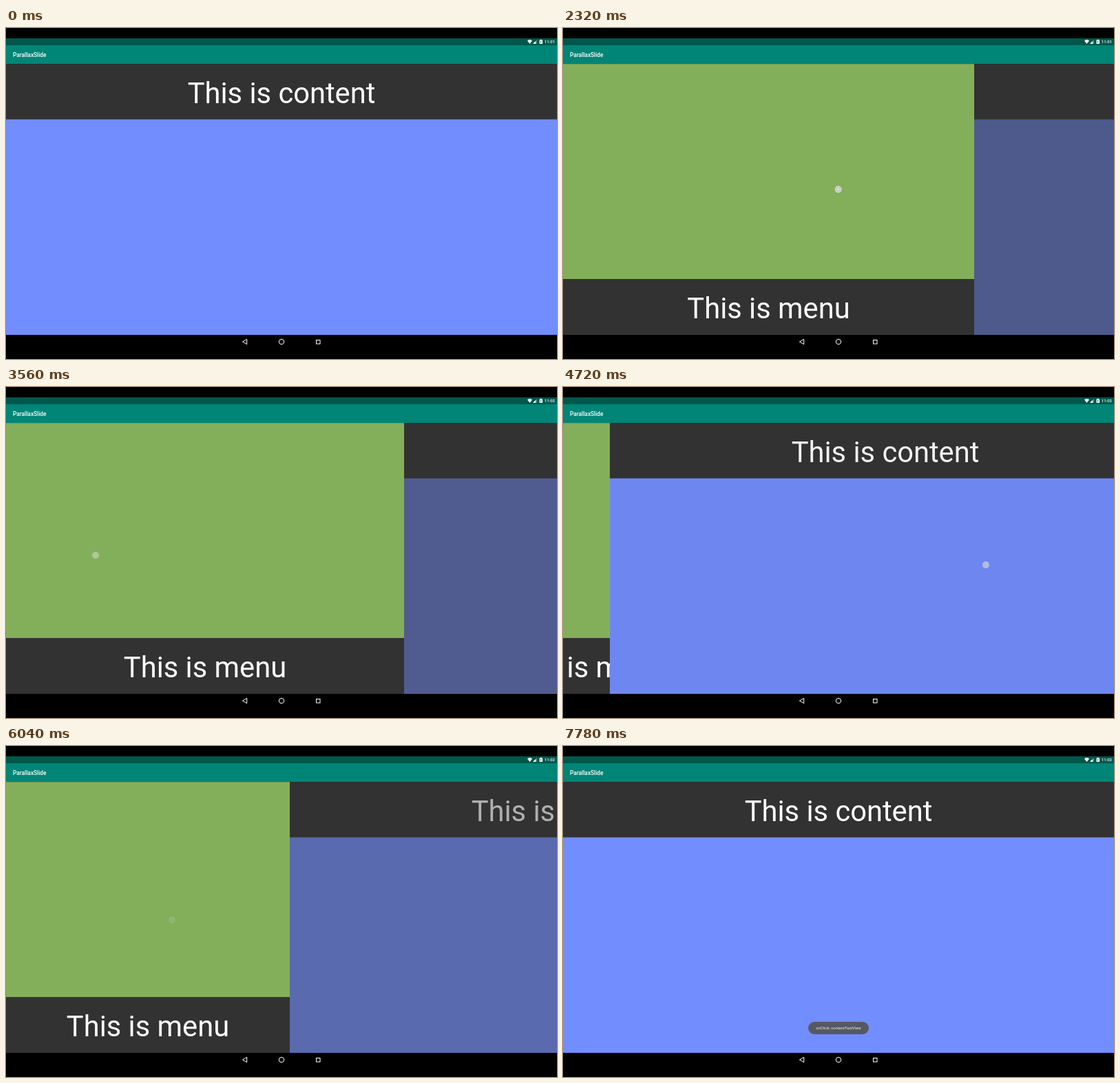
An HTML page with a canvas for the animation above (8 s loop, 800 by 480 pixels).

```html
<!DOCTYPE html>
<html lang="en">
<head>
<meta charset="utf-8">
<title>Sliding pane</title>
<style>
html, body { margin: 0; width: 100%; height: 100%; overflow: hidden; background: #000; }
canvas { display: block; }
</style>
</head>
<body>
<canvas id="stage" width="800" height="480"></canvas>
<script>
const ctx = document.getElementById('stage').getContext('2d');
const LOOP = 8000, STEP = 82.75;
const TOP = 52, BOTTOM = 445, OPEN = 640;
const DARK = '#323232';

// Finger down, starts moving at go, lifts at up; the pane then settles by end.
const gestures = [
  { down: 905, go: 940, up: 1070, end: 1520, x0: 440, x1: 530, y: 250, from: 0, to: OPEN, level: .6 },
  { down: 1815, go: 2200, up: 2660, end: 3050, x0: 443, x1: 174, y: 234, from: OPEN, to: OPEN, level: .85 },
  { down: 3225, go: 3400, up: 3557, end: 4030, x0: 184, x1: 130, y: 244, from: OPEN, to: 0, level: .5 },
  { down: 4465, go: 4550, up: 4720, end: 5120, x0: 546, x1: 614, y: 258, from: 0, to: OPEN, level: .6 },
  { down: 5625, go: 5850, up: 6020, end: 6391, x0: 331, x1: 241, y: 252, from: OPEN, to: 0, level: .2 },
  { down: 6785, go: 6785, up: 7180, end: 7180, x0: 449, x1: 449, y: 104, from: 0, to: 0, level: .6 }
];

const clamp = v => Math.max(0, Math.min(1, v));
const smooth = v => v * v * (3 - 2 * v);

function fingerX(g, t) {
  return g.x0 + (g.x1 - g.x0) * smooth(clamp((t - g.go) / (g.up - g.go || 1)));
}

function paneAt(t) {
  const g = gestures.filter(g => t >= g.down).pop();
  if (!g) return 0;
  const dragged = g.from + fingerX(g, t) - g.x0;
  if (t < g.up) return dragged;
  if (t >= g.end) return g.to;
  const left = (1 - (t - g.up) / (g.end - g.up)) ** 5;
  return g.to + (dragged - g.to) * left;
}

function rect(color, x, y, w, h) {
  ctx.fillStyle = color;
  ctx.fillRect(x, y, w, h);
}

function text(str, x, y, size, align = 'center', weight = 400, color = '#fff') {
  ctx.font = `${weight} ${size}px Roboto, sans-serif`;
  ctx.textAlign = align;
  ctx.fillStyle = color;
  ctx.fillText(str, x, y);
}

function shape(...points) {
  ctx.beginPath();
  points.forEach(p => ctx.lineTo(...p));
  ctx.closePath();
}

function circle(x, y, r) {
  ctx.beginPath();
  ctx.arc(x, y, r, 0, Math.PI * 2);
}

function drawPanes(split) {
  ctx.save();
  ctx.beginPath();
  ctx.rect(0, TOP, 800, BOTTOM - TOP);
  ctx.clip();

  rect('#83af5b', 0, TOP, split, 312);
  rect(DARK, 0, 364, split, 81);
  text('This is menu', split / 2, 421, 41.67);

  rect('#728dfd', split, TOP, 800, 393);
  rect(DARK, split, TOP, 800, 80.5);
  text('This is content', split + 400, 109, 41.67);
  rect(`rgba(51,51,51,${.595 * split / OPEN})`, split, TOP, 800, 393);
  ctx.restore();
}

function drawBars(clock) {
  rect('#00574b', 0, 15, 800, 10);
  rect('#008577', 0, 25, 800, 27);
  rect('rgba(0,0,0,.12)', 0, TOP, 800, 1);
  text('ParallaxSlide', 10, 42, 8.33, 'left', 500);
  text(clock, 797, 22, 6, 'right', 500);

  // wifi
  ctx.beginPath();
  ctx.moveTo(760.5, 23);
  ctx.lineTo(757, 18.5);
  ctx.quadraticCurveTo(760.5, 15.7, 764, 18.5);
  ctx.fill();
  // signal
  ctx.fillStyle = 'rgba(255,255,255,.35)';
  shape([765, 23], [771, 17], [771, 23]);
  ctx.fill();
  ctx.fillStyle = '#fff';
  shape([765, 23], [769, 19], [769, 23]);
  ctx.fill();
  // battery
  rect('#fff', 774.5, 17.5, 4.5, 5.5);
  rect('#fff', 775.7, 16.7, 2, 1);
  rect('#00574b', 776.2, 19, 1, 2.5);

  // navigation
  ctx.strokeStyle = '#fff';
  ctx.lineWidth = 1;
  shape([343.5, 455], [349.7, 451.3], [349.7, 458.7]);
  ctx.stroke();
  circle(400, 455, 3.7);
  ctx.stroke();
  ctx.strokeRect(450.5, 452.5, 5.5, 5.5);
}

function drawTouch(t) {
  for (const g of gestures) {
    if (t < g.down || t > g.up + 80) continue;
    ctx.globalAlpha = g.level * clamp(1 - (t - g.up) / 80);
    const x = fingerX(g, t);
    ctx.fillStyle = '#e2e2e2';
    circle(x, g.y, 5);
    ctx.fill();
    ctx.strokeStyle = '#a8a8a8';
    ctx.lineWidth = .7;
    circle(x, g.y, 3);
    ctx.stroke();
  }
  ctx.globalAlpha = 1;
}

function drawToast(alpha) {
  ctx.globalAlpha = alpha;
  ctx.fillStyle = '#565963';
  ctx.beginPath();
  ctx.roundRect(356, 400, 88, 18, 9);
  ctx.fill();
  text('onClick: contentTextView', 400, 411.3, 5.83, 'center', 400, '#ececec');
  ctx.globalAlpha = 1;
}

function draw(now) {
  const t = Math.floor((now % LOOP + 4) / STEP) * STEP;
  rect('#000', 0, 0, 800, 480);
  drawPanes(Math.round(paneAt(t)));
  drawBars(t < 2810 ? '11:01' : '11:02');
  drawTouch(t);
  drawToast(clamp((t - 7190) / 580));
}

const start = performance.now();
function tick() {
  draw(performance.now() - start);
  requestAnimationFrame(tick);
}
tick();
</script>
</body>
</html>
```
